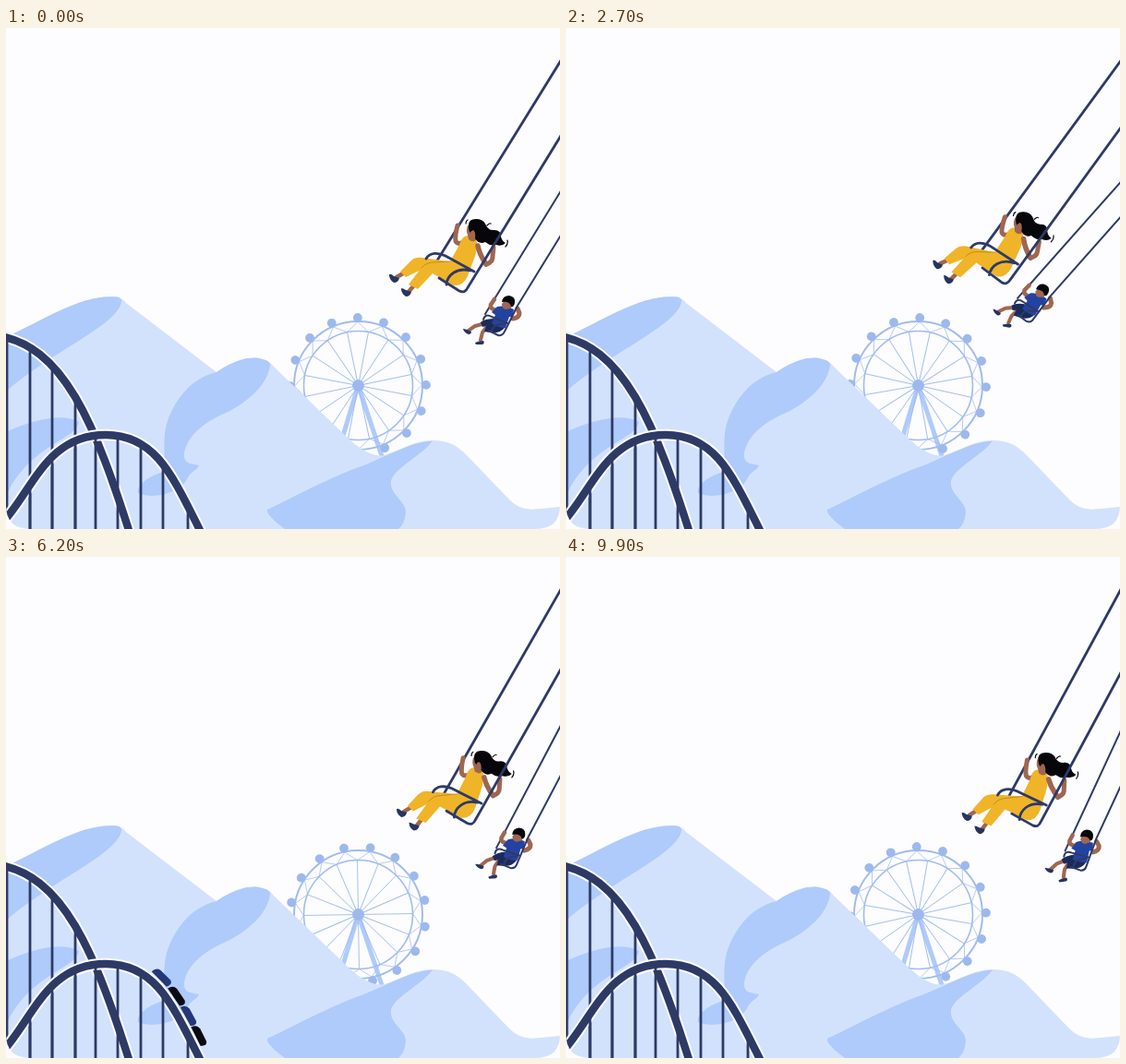
Recreate the animation shown at these times as an HTML page without scripts. Size 600 px wide and 543 px high, loop 10 s.

```html
<!DOCTYPE html>
<html lang="en">
<head>
<meta charset="utf-8">
<title>Fairground</title>
<style>
  html, body { margin: 0; width: 100%; height: 100%; overflow: hidden; background: #fdfcfe; }
  svg { display: block; width: 100vw; height: 100vh; }
  .line { fill: none; stroke: #2e3a66; stroke-linecap: round; stroke-linejoin: round; }
  .halo { fill: none; stroke: #fdfcfe; stroke-width: 12.5; }
  .rail { fill: none; stroke: #2e3a66; stroke-width: 8.5; }
  .posts { fill: none; stroke: #2e3a66; stroke-width: 2.8; }
  .skin { fill: none; stroke: #9f6650; stroke-linecap: round; stroke-linejoin: round; }
  .face { fill: #9f6650; }
  .hair { fill: #07060b; }
  .wisp { fill: none; stroke: #07060b; stroke-width: 1.2; stroke-linecap: round; }
  .suit { fill: #f0b429; }
  .fold { fill: none; stroke: #b98312; stroke-width: .8; stroke-linecap: round; }
  .shoe { fill: #26345f; }
  .light { fill: #d2e2fd; }
  .shade { fill: #aecbfb; }
  .wheel { fill: none; stroke: #a0bcee; }
  .dot { fill: #9db9ec; stroke: none; }
</style>
</head>
<body>
<svg viewBox="0 0 600 543" preserveAspectRatio="none">
  <defs>
    <clipPath id="stage"><path d="M0 0H600V517Q600 543 574 543H26Q0 543 0 517Z"/></clipPath>

    <path id="front" d="M-30 556C25 530 30 441 108 441C165 441 182 490 216 556L232 586"/>
    <path id="back" d="M-60 325L-12 333C62 343 96 426 138 560L148 590"/>
    <path id="car" d="M-12 -7Q-12 -14 -6 -15H9Q13 -14 12 -10L11 -7Z"/>

    <!-- one sixteenth of the wheel, then doubled up -->
    <g id="s1">
      <path d="M0 0V-59" transform="rotate(11.25)" stroke-width=".9"/>
      <path d="M0 -69L11.5 -57.9L26.4 -63.8" stroke-width=".7"/>
      <circle class="dot" cy="-73.5" r="4.9"/>
    </g>
    <g id="s2"><use href="#s1"/><use href="#s1" transform="rotate(22.5)"/></g>
    <g id="s4"><use href="#s2"/><use href="#s2" transform="rotate(45)"/></g>
    <g id="s8"><use href="#s4"/><use href="#s4" transform="rotate(90)"/></g>
  </defs>

  <rect width="600" height="543" fill="#fdfcfe"/>

  <g clip-path="url(#stage)">
    <!-- wheel -->
    <g transform="translate(381.500 387.500)">
      <path d="M-1 3L-23 76M1 3L26 78" fill="none" stroke="#aecbfb" stroke-width="5"/>
      <g class="wheel">
        <circle r="69.5" stroke-width="2"/>
        <circle r="59" stroke-width="1.6"/>
        <g>
          <use href="#s8"/><use href="#s8" transform="rotate(180)"/>
          <animateTransform attributeName="transform" type="rotate" from="-.5" to="89.5" dur="10s" repeatCount="indefinite"/>
        </g>
        <circle class="dot" r="6.5"/>
      </g>
    </g>

    <!-- hills -->
    <path class="light" d="M0 335C42 316 82 288 120 291.500Q125 292 130 298L228 373C245 361 262 356 274 358Q284 359 291 368L372 446Q392 464 407 463.500C425 460 440 447 462 447C478 447 488 452 498 462L546 512Q557 523 573 521.500L600 519V543H0Z"/>
    <path class="shade" d="M0 335C42 316 82 288 120 291.500Q125 292 125 296C122 322 50 350 0 394Z"/>
    <path class="shade" d="M0 438C30 424 62 417 79 427C76 447 24 452 0 508Z"/>
    <path class="shade" d="M228 373C245 361 262 356 274 358Q285 360 286 364C285 384 264 405 238 417C215 427 196 442 193 461C192 473 201 472 209 474C207 480 201 479 196 489C188 505 158 511 143 504C141 497 153 486 168 482C176 475 167 448 175 426C182 406 198 380 228 373Z"/>
    <path class="shade" d="M283 522C320 504 352 487 382 476C412 465 436 449 462 447.500C450 464 420 477 417 491C415 506 433 512 433 525Q432 537 425 543H302Q288 533 283 525Z"/>

    <!-- coaster -->
    <use href="#back" class="halo"/>
    <path class="posts" d="M1 337V543M26 349V543M50 371V543M75 401V543"/>
    <g>
      <use href="#car" fill="#0a0a12"><animateMotion dur="10s" begin="0s" repeatCount="indefinite" rotate="auto" calcMode="linear" keyPoints="0;1;1" keyTimes="0;.108;1"><mpath href="#back"/></animateMotion></use>
      <use href="#car" fill="#24377a"><animateMotion dur="10s" begin="-9.93s" repeatCount="indefinite" rotate="auto" calcMode="linear" keyPoints="0;1;1" keyTimes="0;.108;1"><mpath href="#back"/></animateMotion></use>
      <use href="#car" fill="#0a0a12"><animateMotion dur="10s" begin="-9.86s" repeatCount="indefinite" rotate="auto" calcMode="linear" keyPoints="0;1;1" keyTimes="0;.108;1"><mpath href="#back"/></animateMotion></use>
      <use href="#car" fill="#24377a"><animateMotion dur="10s" begin="-9.79s" repeatCount="indefinite" rotate="auto" calcMode="linear" keyPoints="0;1;1" keyTimes="0;.108;1"><mpath href="#back"/></animateMotion></use>
    </g>
    <use href="#back" class="rail"/>

    <use href="#front" class="halo"/>
    <g>
      <use href="#car" fill="#0a0a12"><animateMotion dur="10s" begin="0s" repeatCount="indefinite" rotate="auto" calcMode="linear" keyPoints="0;0;1;1" keyTimes="0;.435;.661;1"><mpath href="#front"/></animateMotion></use>
      <use href="#car" fill="#24377a"><animateMotion dur="10s" begin="-9.86s" repeatCount="indefinite" rotate="auto" calcMode="linear" keyPoints="0;0;1;1" keyTimes="0;.435;.661;1"><mpath href="#front"/></animateMotion></use>
      <use href="#car" fill="#0a0a12"><animateMotion dur="10s" begin="-9.72s" repeatCount="indefinite" rotate="auto" calcMode="linear" keyPoints="0;0;1;1" keyTimes="0;.435;.661;1"><mpath href="#front"/></animateMotion></use>
      <use href="#car" fill="#24377a"><animateMotion dur="10s" begin="-9.58s" repeatCount="indefinite" rotate="auto" calcMode="linear" keyPoints="0;0;1;1" keyTimes="0;.435;.661;1"><mpath href="#front"/></animateMotion></use>
    </g>
    <use href="#front" class="rail"/>
    <path class="posts" d="M26 497V543M50 470V543M75 451V543M97 443V543M121 443V543M146 451V543M170 473V543M197 518V543"/>
  </g>

  <!-- boy -->
  <g>
    <path class="line" stroke-width="2" d="M640 113L519 310"/>
    <path class="skin" stroke-width="4.500" d="M532 306Q524 305 525 300L529 294"/>
    <path class="skin" stroke-width="4" d="M519 320L508 323L501 328M522 322L516 330L514 338"/>
    <path class="shoe" d="M495 326Q498 326 504 329Q504 332 501 332Q496 330 495 326ZM508 341Q512 339 517 339Q519 342 516 343H509Z"/>
    <path fill="#1b2a5c" d="M530 315Q518 315 514 319L516 324L520 323L518 329L524 330Q534 332 540 325Z"/>
    <path fill="#2443a0" d="M532 302Q540 300 550 305L549 313L545 313L541 325Q532 325 526 320L530 311L526 308Z"/>
    <path class="face" d="M537 299Q537 304 541 305L547 304L549 297L542 293Z"/>
    <path class="hair" d="M537 297Q538 290 545 290Q552 291 551 298Q550 303 547 302Q546 296 537 297Z"/>
    <path class="skin" stroke-width="5" d="M549 315Q556 314 556 309L554 304"/>
    <path class="line" stroke-width="2" d="M640 161L554 301L540 329Q538 334 533 333L523 328M517 316Q519 309 526 313L543 320M526 329Q527 320 540 321"/>
    <animateTransform attributeName="transform" type="rotate" dur="10s" repeatCount="indefinite" calcMode="spline"
      values="0 602 130;10 602 130;10 602 130;-6.700 602 130;-6.700 602 130" keyTimes="0;.21;.33;.73;1"
      keySplines=".39 .57 .56 1;0 0 1 1;.37 0 .63 1;0 0 1 1"/>
  </g>

  <!-- girl -->
  <g>
    <path class="line" stroke-width="2.800" d="M640 -28L467 252"/>
    <path class="skin" stroke-width="5" d="M497 231Q490 236 487 231Q486 226 489 214"/>
    <path class="skin" stroke-width="4.500" d="M432 265L423 270M441 280L436 286"/>
    <path class="shoe" d="M415 267Q417 266 420 269L426 271Q425 276 420 276Q415 273 415 267ZM428 282Q430 282 433 284L439 286Q438 291 433 291Q428 288 428 282Z"/>
    <path class="suit" d="M427 264L439 252Q443 248 451 249L480 253L482 264L452 261L433 270Z"/>
    <path class="suit" d="M436 278L449 261Q454 254 463 254L481 253L491 235Q494 225 500 225L510 231Q511 240 507 250L500 269Q495 280 485 279L462 266L446 283Z"/>
    <path class="fold" d="M450 260Q455 254 463 254L481 253"/>
    <path class="face" d="M500 214Q498 220 500 224L501 229Q505 233 509 230L510 215Z"/>
    <path class="hair" d="M501 216Q500 207 509 207Q516 207 519 212Q522 220 529 219Q536 219 536 226Q537 231 541 233Q537 237 531 235Q525 237 519 232Q512 235 508 228Q509 221 506 219Q503 220 503 222Q501 220 501 216Z"/>
    <path class="wisp" d="M498 212Q498 209 500 208M521 214Q524 211 525 212M541 237Q544 234 543 230"/>
    <path class="skin" stroke-width="5.500" d="M511 236Q513 246 520 256"/>
    <path class="skin" stroke-width="5" d="M520 256Q527 254 527 248L528 238"/>
    <path class="line" stroke-width="2.800" d="M640 53L500 281.500Q497 288 491 285L469 271M455 250C459 243 468 243 476 247L507 264M477 278C478 268 488 259 503 263"/>
    <animateTransform attributeName="transform" type="rotate" dur="10s" repeatCount="indefinite" calcMode="spline"
      values="0 600 36;4.500 600 36;4.500 600 36;-3.300 600 36;-3.300 600 36" keyTimes="0;.21;.33;.73;1"
      keySplines=".39 .57 .56 1;0 0 1 1;.37 0 .63 1;0 0 1 1"/>
  </g>
</svg>
</body>
</html>
```
